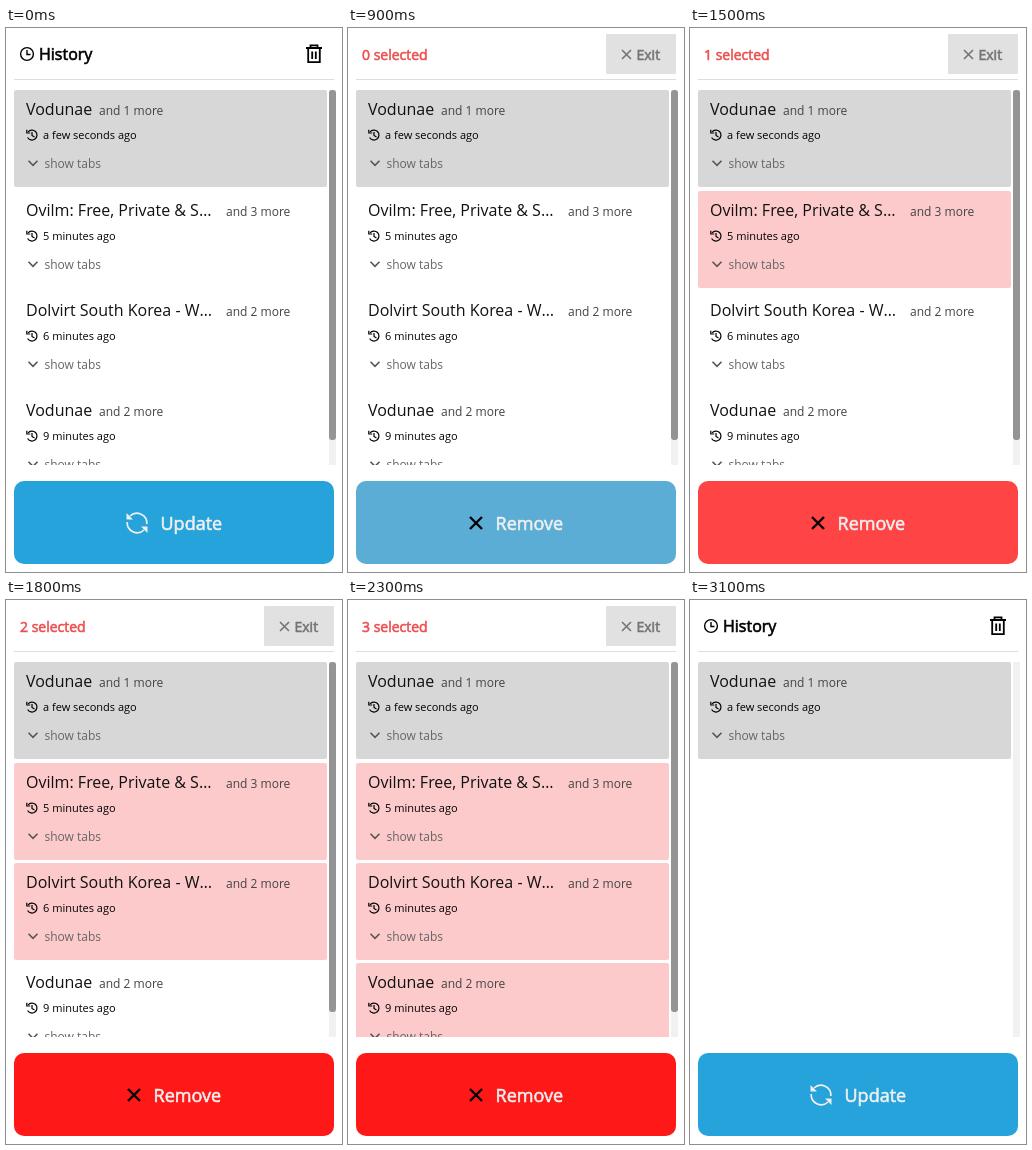
Animation of 336 by 544 pixels, one loop 4700 ms. Source, as an HTML page:

```html
<!DOCTYPE html>
<html lang="en">
<head>
<meta charset="utf-8">
<style>
  html, body { margin: 0; width: 100%; height: 100%; overflow: hidden; background: #fff; }
  svg { display: block; font-family: "Open Sans", sans-serif; }
  .line { fill: none; stroke: currentColor; }
  .bold { fill: currentColor; stroke: currentColor; stroke-width: .6px; }
</style>
</head>
<body>
<svg id="stage" width="336" height="544" viewBox="0 0 336 544">
  <defs>
    <clipPath id="listClip"><rect y="62" width="336" height="375"/></clipPath>
    <g id="cross"><path class="line" d="M-1-1L1 1M1-1L-1 1" vector-effect="non-scaling-stroke"/></g>
    <g id="rewind" class="line" stroke-width="1.2">
      <path d="M22 104A5 5 0 1 1 21.6 109.5M26 104V107.5L28.5 109"/>
      <path d="M20.8 101.8V105H24.2"/>
    </g>
  </defs>

  <g id="normalHeader">
    <rect id="trashBg" x="288" y="6" width="40" height="40" fill="#ededed"/>
    <g class="line" stroke-width="1.4">
      <circle cx="21" cy="26" r="6.4"/>
      <path d="M21 22V26.5H24.5"/>
    </g>
    <text class="bold" x="33" y="32" font-size="16">History</text>
    <path id="trash" class="line" stroke-width="1.8"
      d="M300 20H316M304.5 20V17.4H311.5V20M302.2 20V34.2H313.8V20M306.2 23.5V31M309.8 23.5V31"/>
  </g>

  <g id="selectHeader">
    <text id="count" class="bold" x="14" y="32" font-size="14" color="#ec4f4f"></text>
    <rect x="258" y="6" width="70" height="40" rx="1" fill="#e1e1e1"/>
    <g color="#747474">
      <use href="#cross" transform="translate(278.5 26.5) scale(4.5)" stroke-width="1.6"/>
      <text class="bold" x="288.5" y="32" font-size="14">Exit</text>
    </g>
  </g>

  <rect x="8" y="51" width="320" height="1" fill="#dedede"/>
  <g id="list" clip-path="url(#listClip)"></g>
  <rect x="323" y="62" width="7" height="375" fill="#f1f1f1"/>
  <rect id="thumb" x="323" y="62" width="7" height="350" rx="3" fill="#949494"/>

  <rect id="button" x="8" y="453" width="320" height="83" rx="10"/>
  <g id="update" color="#f0f0f0">
    <path class="line" stroke-width="1.7" d="M124 488A10 10 0 0 1 140.8 496M138 502A10 10 0 0 1 121.2 494"/>
    <path fill="currentColor" d="M120.5 485V491.5H127ZM141.5 505V498.5H135Z"/>
    <text class="bold" x="154.5" y="502" font-size="18">Update</text>
  </g>
  <g id="remove">
    <use href="#cross" transform="translate(128 495) scale(6)" stroke-width="2.4"/>
    <text class="bold" x="147.5" y="502" font-size="18" color="#f0f0f0">Remove</text>
  </g>
</svg>
<script>
const LOOP = 4700, HOVER_TRASH = 500, SELECT_MODE = 900, REMOVED = 3100;
const BLUE = [37, 163, 218], PINK = [252, 202, 202], RED = [255, 24, 24];
const $ = id => document.getElementById(id);

const rows = [
  { y: 62, title: "Vodunae", more: 1, moreX: 93, age: "a few seconds ago" },
  { y: 163, title: "Ovilm: Free, Private &amp; S…", more: 3, moreX: 220, age: "5 minutes ago", hover: 1200, pick: 1400 },
  { y: 263, title: "Dolvirt South Korea - W…", more: 2, moreX: 220, age: "6 minutes ago", hover: 1600, pick: 1700 },
  { y: 363, title: "Vodunae", more: 2, moreX: 93, age: "9 minutes ago", hover: 2000, pick: 2200 },
];

$("list").innerHTML = rows.map(r => `
  <g transform="translate(0 ${r.y - 62})">
    <rect x="8" y="62" width="313" height="97" rx="2" fill="#d7d7d7"/>
    <text x="20" y="87" font-size="16" fill="#111">${r.title}</text>
    <text x="${r.moreX}" y="87" font-size="12" fill="#444">and ${r.more} more</text>
    <use href="#rewind"/>
    <text x="37" y="111" font-size="11">${r.age}</text>
    <path class="line" d="M22.5 132.8L27 137.3L31.5 132.8" color="#555" stroke-width="1.6"/>
    <text x="38.5" y="140" font-size="12" fill="#666">show tabs</text>
  </g>`).join("");
rows.forEach((r, i) => {
  r.node = $("list").children[i];
  r.bg = r.node.querySelector("rect");
});

const show = (node, on) => node.setAttribute("display", on ? "inline" : "none");
const ramp = (t, start, length) => Math.min(1, Math.max(0, (t - start) / length));
const mix = (a, b, k) => `rgb(${a.map((v, i) => Math.round(v + (b[i] - v) * k))})`;

function draw(t) {
  const removed = t >= REMOVED;
  const selecting = t >= SELECT_MODE && !removed;
  const hovering = t >= HOVER_TRASH && !removed;
  const [current, ...older] = rows;
  const firstPick = older[0].pick;

  show($("normalHeader"), !selecting);
  show($("selectHeader"), selecting);
  show($("update"), !selecting);
  show($("remove"), selecting);
  show($("thumb"), !removed);
  show($("trashBg"), hovering);
  $("trash").style.color = hovering ? "#e02020" : "#000";
  $("count").textContent = older.filter(r => t >= r.pick).length + " selected";

  for (const r of older) {
    show(r.node, !removed);
    r.bg.setAttribute("fill", t >= r.pick ? mix(PINK, PINK, 0) : t >= r.hover ? "#f0f0f0" : "#fff");
  }

  const color = !selecting ? mix(BLUE, BLUE, 0)
    : t < firstPick ? mix(BLUE, PINK, ramp(t, SELECT_MODE - 50, 200))
    : mix(PINK, RED, ramp(t, firstPick - 50, 200));
  $("button").setAttribute("fill", color);
}

function tick() {
  draw(performance.now() % LOOP);
  requestAnimationFrame(tick);
}
tick();
</script>
</body>
</html>
```
